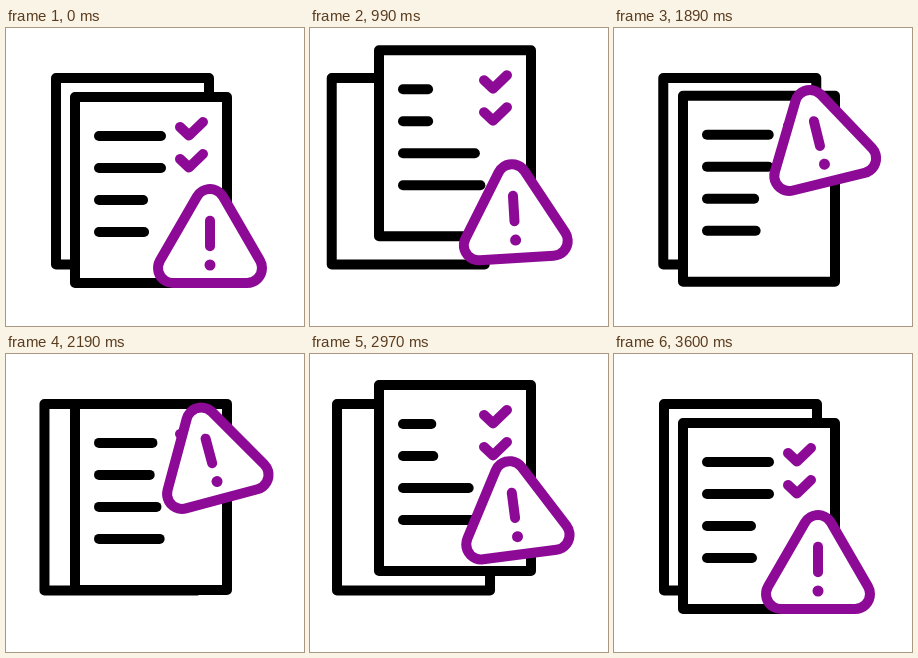
An HTML page for the animation above (3630 ms loop, 298x298 px).

```html
<!DOCTYPE html>
<html lang="en">
<head>
<meta charset="utf-8">
<title>Checklist warning</title>
<style>
  html, body { margin: 0; width: 100%; height: 100%; overflow: hidden; background: #fff; }
  svg { display: block; width: 100%; height: 100%; }
  .ink { stroke: #000; }
  .accent { stroke: #8c0a96; }
</style>
</head>
<body>
<svg viewBox="0 0 298 298" fill="none" stroke-width="10" stroke-linecap="round" stroke-linejoin="round">
  <rect id="back" class="ink" x="50" y="50" width="153" height="186.5"/>
  <g id="front">
    <rect class="ink" fill="#fff" x="69" y="69" width="152" height="186"/>
    <g id="lines" class="ink"><path/><path/><path/><path/></g>
    <path class="accent" d="M174 99l9 8.5 14-13.5M174 131l9 8.5 14-13.5"/>
  </g>
  <!-- warning sign, drawn around its centroid -->
  <g id="sign">
    <path class="accent" stroke-width="40" d="M0-42.7L-37 21.3H37Z"/>
    <path stroke="#fff" fill="#fff" stroke-width="20" d="M0-42.7L-37 21.3H37Z"/>
    <path class="accent" d="M0-26V-.5"/>
    <path class="accent" stroke-width="11" d="M0 18.3h.01"/>
  </g>
</svg>
<script>
const LOOP = 3630, CYCLE = 1800;
const [back, front, lines, sign] = ['back', 'front', 'lines', 'sign'].map(id => document.getElementById(id));

const ease = p => (1 - Math.cos(Math.PI * p)) / 2;
const ramp = (t, from, to) => ease(Math.min(1, Math.max(0, (t - from) / (to - from))));
const swing = p => ease(2 * p);                  // 0 -> 1 -> 0, smooth
const zigzag = p => 1 - Math.abs(1 - 2 * p);     // 0 -> 1 -> 0, linear
const move = (el, x, y, turn = 0) => el.setAttribute('transform', `translate(${x} ${y}) rotate(${turn})`);

function draw(t) {
  const p = t >= 2 * CYCLE ? 0 : (t % CYCLE) / CYCLE;
  const lift = swing(p);
  move(back, -29 * lift, 0);
  move(front, 0, -48 * lift);

  const ends = [
    155 - 37 * swing(p ** 1.2),
    155 - 37 * swing(p ** 1.1),
    137 + 31 * zigzag(p),
    138 + 36 * zigzag(p)
  ];
  ends.forEach((x, i) => lines.children[i].setAttribute('d', `M93 ${108 + 32 * i}H${x}`));

  const rise = ramp(t, 420, 2220) - ramp(t, 2700, 3240);
  move(sign, 204 + 2.3 * rise, 218.7 - 109 * rise, -15 * rise);
}

const start = performance.now();
function tick() {
  draw((performance.now() - start) % LOOP);
  requestAnimationFrame(tick);
}
tick();
</script>
</body>
</html>
```
